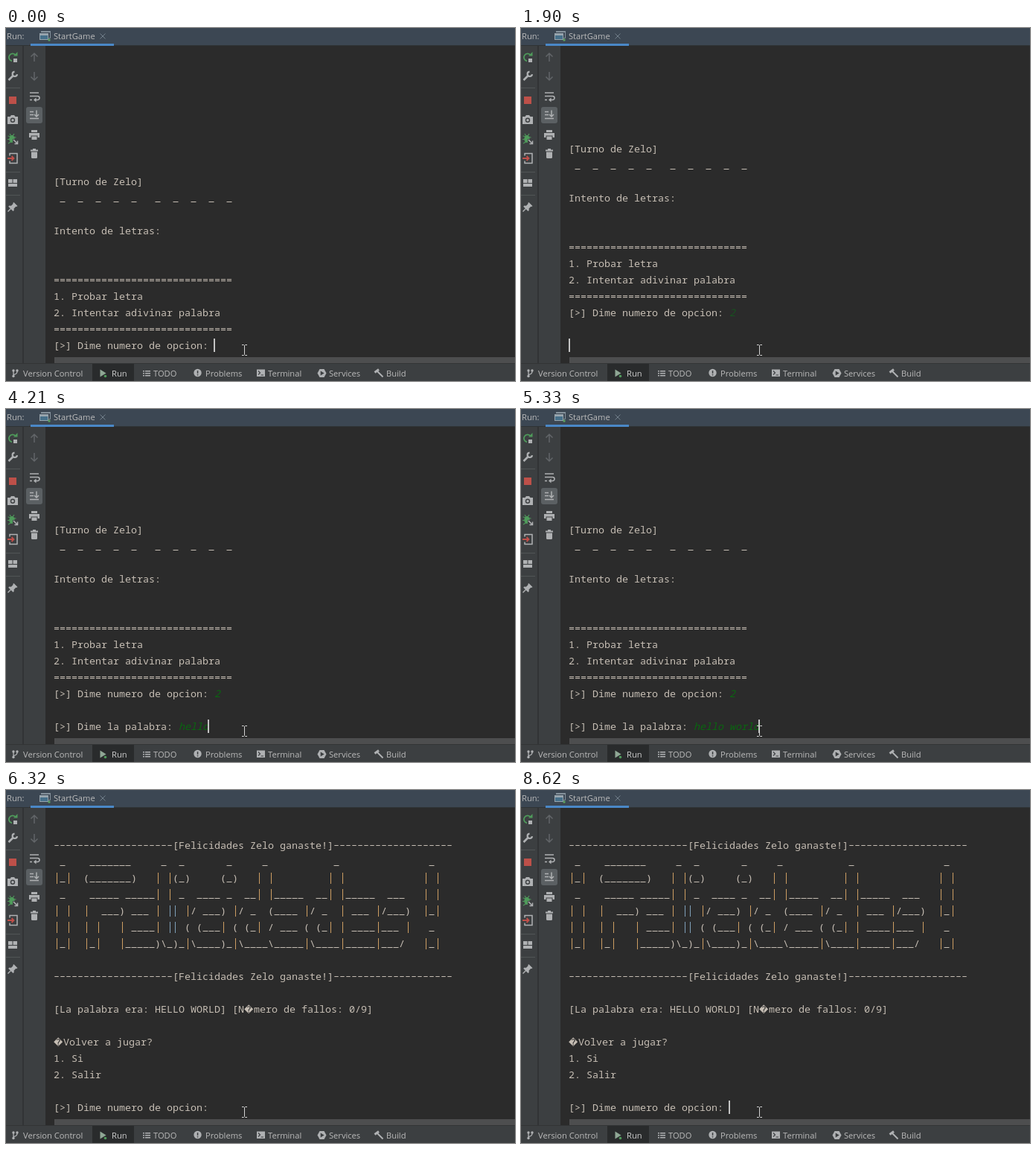
Write an HTML page with a canvas that moves like this. It is 684 by 474 pixels and loops after 8750 ms.

```html
<!DOCTYPE html>
<html lang="es">
<head>
<meta charset="utf-8">
<title>Consola</title>
<style>
html, body { margin: 0; width: 100%; height: 100%; overflow: hidden; background: #2b2b2b; }
canvas { display: block; width: 684px; height: 474px; }
</style>
</head>
<body>
<canvas id="stage" width="684" height="474"></canvas>
<script>
const ctx = document.getElementById('stage').getContext('2d');
const LOOP = 8750, CELL = 8, LEFT = 64, LINE = 22, LAST_BASE = 431;
const MONO = '13.33px "Noto Sans Mono", "DejaVu Sans Mono", monospace';
const WIDE = '12px "DejaVu Sans", sans-serif';
const UI = '11.15px "Open Sans", "Noto Sans", sans-serif';
const TEXT = '#c6beb4', ICON = '#afb1b3', DIM = '#626669', GREEN = '#4f9a5b', RED = '#c0504a';
const PANEL = '#3c3f41';

const PLAYER = 'Zelo';
const UNKNOWN = '\uFFFD', UNKNOWN_WIDTH = 13;
const ASK = '[>] Dime numero de opcion: ';
const ASK_WORD = '[>] Dime la palabra: ';
const RULE = '='.repeat(30);
const TURN = [`[Turno de ${PLAYER}]`, ' _  _  _  _  _   _  _  _  _  _', '', 'Intento de letras:', '', '',
  RULE, '1. Probar letra', '2. Intentar adivinar palabra', RULE];
const CHEER = '-'.repeat(20) + `[Felicidades ${PLAYER} ganaste!]` + '-'.repeat(20);
const BANNER = String.raw`
 _    _______     _  _       _     _           _               _
|_|  (_______)   | |(_)     (_)   | |         | |             | |
 _    _____ _____| | _  ____ _  __| |_____  __| |_____  ___   | |
| |  |  ___) ___ | || |/ ___) |/ _  (____ |/ _  | ___ |/___)  |_|
| |  | |   | ____| || ( (___| ( (_| / ___ ( (_| | ____|___ |   _
|_|  |_|   |_____)\_)_|\____)_|\____\_____|\____|_____|___/   |_|`.split('\n').slice(1);
const WIN = [CHEER, ...BANNER, '', CHEER, '',
  `[La palabra era: HELLO WORLD] [N${UNKNOWN}mero de fallos: 0/9]`, '',
  `${UNKNOWN}Volver a jugar?`, '1. Si', '2. Salir', ''];
const WORD = 'hello world';
const KEYS = [3360, 3620, 3880, 4010, 4210, 4540, 4740, 4870, 5000, 5200, 5330];
const HIDDEN = [[530, 1050], [3090, 3360], [6315, 6380], [7100, 7620], [8090, 8620]];

function rect(color, x, y, w, h) {
  ctx.fillStyle = color;
  ctx.fillRect(x, y, w, h);
}

function stroke(color, width, d) {
  ctx.strokeStyle = color;
  ctx.lineWidth = width;
  ctx.stroke(new Path2D(d));
}

function fill(color, d) {
  ctx.fillStyle = color;
  ctx.fill(new Path2D(d));
}

function dot(color, x, y, r) {
  ctx.fillStyle = color;
  ctx.beginPath();
  ctx.arc(x, y, r, 0, Math.PI * 2);
  ctx.fill();
}

function label(text, x, y, color = '#bbbbbb') {
  ctx.font = UI;
  ctx.fillStyle = color;
  ctx.fillText(text, x, y);
}

// Line-like characters are drawn as crisp bars, the rest as text in cells.
function drawRow(text, x, base, color, font) {
  [...text].forEach((ch, i) => {
    ctx.font = ch === UNKNOWN ? WIDE : font;
    ctx.fillStyle = color;
    if (ch === '_') {
      rect(color, x + 0.5, base, 7, 1);
    } else if (ch === '-') {
      rect(color, x + 1.3, base - 5, 5.4, 1);
    } else if (ch === '|') {
      const after = text[i - 1] === '|', before = text[i + 1] === '|';
      rect(after || before ? '#7f9fb8' : '#cc9d62', x + (after ? 3 : 4), base - 12, 1, 15);
    } else if (ch !== ' ') {
      ctx.fillText(ch, x, base);
    }
    x += ch === UNKNOWN ? UNKNOWN_WIDTH : CELL;
  });
}

// Rows are either plain text or [prompt, typed answer].
function screen(t) {
  if (t >= 6250) return [...WIN, t < 6315 ? '' : ASK];
  const rows = [...TURN, [ASK, t < 1440 ? '' : '2']];
  if (t < 1900) return rows;
  rows.push('');
  if (t < 2100) return [...rows, ''];
  rows.push([ASK_WORD, WORD.slice(0, KEYS.filter(k => t >= k).length)]);
  if (t >= 6050) rows.push('');
  return rows;
}

function drawConsole(t) {
  const rows = screen(t);
  const typedColor = t >= 6050 ? '#087f08' : t >= 2100 ? '#0a6610' : '#17531f';
  rows.forEach((row, i) => {
    const [text, typed] = [row, ''].flat();
    const base = LAST_BASE - (rows.length - 1 - i) * LINE;
    drawRow(text, LEFT, base, TEXT, MONO);
    drawRow(typed, LEFT + text.length * CELL, base, typedColor, 'italic ' + MONO);
  });
  if (HIDDEN.some(([a, b]) => t >= a && t < b)) return;
  const cols = [rows[rows.length - 1]].flat().join('').length;
  rect('#c4c4c4', Math.max(LEFT, LEFT + cols * CELL - 1), 417, 2, 18);
}

function drawHeader() {
  rect('#3c4753', 0, 0, 684, 23);
  rect('#2f3335', 0, 23, 684, 1);
  label('Run:', 1, 15);
  rect('#4a88c7', 33, 21, 112, 3);
  stroke('#84919b', 1, 'M47.5 5V4.5h12v9h-2');
  rect('#84919b', 47, 4, 13, 2);
  rect('#97a4ad', 45, 7, 12, 9);
  rect('#46708a', 46, 10, 10, 5);
  dot('#5b9f62', 58, 16, 1.7);
  label('StartGame', 64, 15);
  stroke('#73808b', 1, 'M126.5 7.5l7 7m0-7l-7 7');
}

function drawRunTools() {
  for (const y of [80, 193, 224]) rect('#515556', 0, y, 19, 1);
  // rerun
  stroke(GREEN, 1.8, 'M13 36.5A5 5 0 1 0 8 44.3');
  fill(GREEN, 'M10 37.5h5.5v-5.5z');
  rect(ICON, 10, 41, 5, 5);
  // wrench
  stroke(ICON, 2.6, 'M3.5 70L10 63.5');
  stroke(ICON, 2.2, 'M11.5 58.6A3.2 3.2 0 1 0 15 62.2');
  // stop
  rect('#bd5049', 4, 92, 10, 10);
  // camera
  fill(ICON, 'M2 119h3.5l1.5-2h4l1.5 2H16v10H2z');
  dot(PANEL, 9, 123.7, 3.2);
  dot(ICON, 9, 123.7, 1.8);
  // bug
  ctx.fillStyle = GREEN;
  ctx.beginPath();
  ctx.ellipse(8, 149, 3.7, 5, 0, 0, Math.PI * 2);
  ctx.fill();
  stroke(GREEN, 1.2, 'M2.5 145l11 2M2 149.5h8M3 155l5-3M5 142l2 3m4-3l-2 3');
  rect(PANEL, 9, 149, 8, 7);
  stroke(ICON, 1.5, 'M10 150l5.5 5.5M11.5 155.5h4v-4');
  // exit
  stroke(ICON, 1.5, 'M5 171.5v-3h10v13H5v-3');
  stroke(RED, 1.8, 'M2 175h8M7.5 172l3 3-3 3');
  // layout
  rect(ICON, 3, 203, 5.5, 5);
  rect(ICON, 9.5, 203, 5.5, 5);
  rect(ICON, 3, 209, 12, 4);
  // pin
  fill(ICON, 'M10.5 234l5 5-1.3 1-1-.3-2.6 2.7.2 2.4-1.3 1.2-6.3-6.3 1.3-1.2 2.4.2 2.7-2.6-.3-1z');
  stroke(ICON, 1.4, 'M6.5 242.5L2.5 246.5');
}

function drawConsoleTools() {
  stroke(DIM, 1.5, 'M38 45V34M33.5 38.5L38 34l4.5 4.5');
  stroke(DIM, 1.5, 'M38 59v11M33.5 65.5L38 70l4.5-4.5');
  // soft wrap
  stroke(ICON, 1.6, 'M32 87h12M32 91.5h10.5a2.5 2.5 0 0 1 0 5H39M32 96.5h3');
  fill(ICON, 'M37 96.5l3.5-3v6z');
  // scroll to end
  ctx.fillStyle = '#5b6063';
  ctx.beginPath();
  ctx.roundRect(27, 106, 22, 22, 3);
  ctx.fill();
  stroke(ICON, 1.5, 'M32 112.5h5M32 116.5h5M32 121.5h12M41 110.5v8M38 116l3 3 3-3');
  // printer
  rect(ICON, 34, 137, 8, 3);
  rect(ICON, 31, 141, 14, 6);
  rect(PANEL, 33.5, 144.5, 9, 5);
  rect(ICON, 34.5, 145.5, 7, 4.5);
  // trash
  rect(ICON, 36, 162, 4, 2);
  rect(ICON, 33, 163.5, 10, 2);
  fill(ICON, 'M34 166.5h8v7q0 1.5-1.5 1.5h-5q-1.5 0-1.5-1.5z');
}

function drawBottomBar() {
  rect(PANEL, 0, 451, 684, 23);
  rect('#323435', 0, 450, 684, 1);
  rect('#292b2c', 116, 451, 56, 23);
  // branch
  stroke(ICON, 1.3, 'M10 460v7M15 461q0 4-5 4.5');
  dot(ICON, 10, 460, 1.7);
  dot(ICON, 10, 467.5, 1.7);
  dot(ICON, 15, 460, 1.7);
  // play, with its running mark
  fill('#8fa795', 'M126.5 458.5v10l8-5z');
  dot(GREEN, 133.5, 467.5, 1.8);
  // list
  for (const y of [460, 463, 466]) {
    rect(ICON, 184, y, 2, 1.5);
    rect(ICON, 187, y, 7, 1.5);
  }
  // warning
  dot(ICON, 257.5, 463, 5.2);
  rect(PANEL, 256.8, 460, 1.5, 4);
  rect(PANEL, 256.8, 465, 1.5, 1.5);
  // terminal
  rect(ICON, 337, 458.5, 11, 9.5);
  stroke(PANEL, 1.2, 'M339 460.5l2.5 2.5-2.5 2.5M342.5 466h3.5');
  // services
  fill(ICON, 'M421.5 458h6l3 5.5-3 5.5h-6l-3-5.5z');
  fill(PANEL, 'M422.7 460.5v6l5-3z');
  // hammer
  stroke(ICON, 3, 'M495.5 462.5l5.5-4');
  stroke(ICON, 2, 'M499 461l7.5 7.5');
  const tabs = { 'Version Control': 23, TODO: 198, Problems: 268, Terminal: 352, Services: 434, Build: 511 };
  for (const name in tabs) label(name, tabs[name], 468);
  label('Run', 142, 468, '#d0d0d0');
}

function drawPointer() {
  stroke('#d4d4d4', 1, 'M317 425.5h2.5l1 1 1-1h2.5M320.5 426v12M317 439.5h2.5l1-1 1 1h2.5');
}

function draw(t) {
  rect('#2b2b2b', 0, 0, 684, 474);
  rect(PANEL, 0, 24, 53, 427);
  rect('#313335', 22, 24, 2, 427);
  drawHeader();
  drawRunTools();
  drawConsoleTools();
  rect('#4d4e4f', 65, 442, 619, 8);
  drawBottomBar();
  drawConsole(t);
  drawPointer();
}

const start = performance.now();
function tick() {
  draw((performance.now() - start) % LOOP);
  requestAnimationFrame(tick);
}
tick();
</script>
</body>
</html>
```
